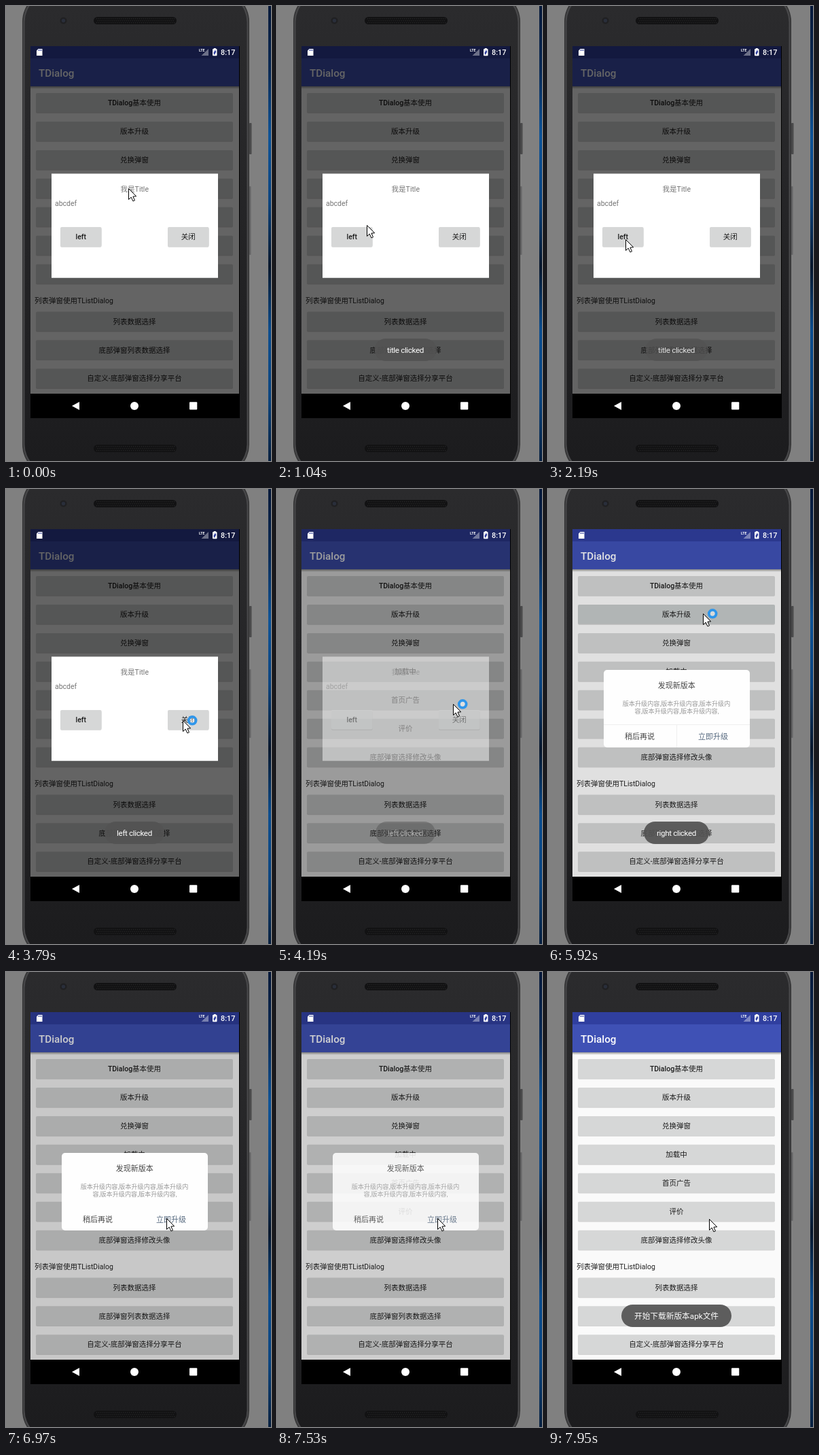
Animation of 390x669 px, one loop 8 s. Source, as an HTML page with a canvas:

```html
<!DOCTYPE html>
<html lang="zh">
<head>
<meta charset="utf-8">
<title>TDialog</title>
<style>
html, body { margin: 0; width: 100%; height: 100%; overflow: hidden; background: #808080; }
canvas { display: block; width: 390px; height: 669px; }
</style>
</head>
<body>
<canvas id="stage" width="390" height="669"></canvas>
<script>
const ctx = document.getElementById('stage').getContext('2d');
const LOOP = 8000;
const FONT = 'Roboto, "Noto Sans CJK SC", "Noto Sans CJK", sans-serif';

// Pointer moves between clicks.
const MOVES = [
  { from: 450, to: 1430, x: 114, y: 343 },
  { from: 3050, to: 3790, x: 260, y: 339.5 },
  { from: 4070, to: 4760, x: 257, y: 244 },
  { from: 4910, to: 5370, x: 228, y: 183 },
  { from: 6070, to: 6970, x: 236, y: 362 },
  { from: 7530, to: 7800, x: 237, y: 363 }
];

const MENU = ['TDialog基本使用', '版本升级', '兑换弹窗', '加载中', '首页广告', '评价', '底部弹窗选择修改头像'];
const LISTS = ['列表数据选择', '底部弹窗列表数据选择', '自定义-底部弹窗选择分享平台'];

const ramp = (t, a, b) => Math.min(1, Math.max(0, (t - a) / (b - a)));
const pulse = (t, a, b, c, d) => ramp(t, a, b) * (1 - ramp(t, c, d));
const easeOut = k => k * (1.5 - k / 2);

function pointerAt(t) {
  let x = 180, y = 268;
  for (const m of MOVES) {
    const k = easeOut(ramp(t, m.from, m.to));
    x += (m.x - x) * k;
    y += (m.y - y) * k;
  }
  return [Math.round(x), Math.round(y)];
}

function rect(x, y, w, h, color, r = 0) {
  ctx.fillStyle = color;
  ctx.beginPath();
  ctx.roundRect(x, y, w, h, r);
  ctx.fill();
}

function disc(x, y, r, color) {
  ctx.fillStyle = color;
  ctx.beginPath();
  ctx.arc(x, y, r, 0, Math.PI * 2);
  ctx.fill();
}

function poly(points, color) {
  ctx.fillStyle = color;
  ctx.beginPath();
  points.forEach(([x, y]) => ctx.lineTo(x, y));
  ctx.closePath();
  ctx.fill();
}

function text(s, x, y, size, color, align = 'center', weight = 400) {
  ctx.font = `${weight} ${size}px ${FONT}`;
  ctx.textAlign = align;
  ctx.fillStyle = color;
  ctx.fillText(s, x, y);
}

function fade(top, bottom, ...colors) {
  const g = ctx.createLinearGradient(0, top, 0, bottom);
  colors.forEach((c, i) => g.addColorStop(i / (colors.length - 1), c));
  return g;
}

function button(label, x, y, w, color = '#d6d7d7') {
  rect(x, y + 1, w, 28.8, 'rgba(0,0,0,.16)', 2);
  rect(x, y, w, 28.6, color, 2);
  text(label, x + w / 2, y + 18.2, 10.5, '#1b1b1b', 'center', /^[A-Za-z]/.test(label) ? 500 : 400);
}

function mesh(y) {
  rect(129, y, 122, 11, '#121213', 5.5);
  for (let row = 0; row < 3; row++)
    for (let x = 133 + row % 2 * 1.5; x < 248; x += 3)
      rect(x, y + 2 + row * 3, 1.3, 1.3, '#262627');
}

function phone() {
  rect(0, 0, 390, 669, '#808080');
  rect(386, 0, 4, 669, fade(0, 669, '#07193a', '#0a2a55', '#0d5398', '#0b4480', '#08172c', '#0b4d8f', '#0b4580', '#08203f'));
  rect(358, 172, 3.5, 46, '#4a4a4b', 1);
  rect(358, 265, 2.5, 101, '#646465', 1);
  rect(24, -22, 334, 712, '#343435', 45);
  rect(25.5, -20.5, 331, 709, '#48484a', 43.5);
  rect(27.5, -18.5, 327, 705, fade(0, 669, '#2b2b2d', '#242426', '#1c1c1e'), 42);
  mesh(16);
  mesh(645);
  disc(84.5, 21.5, 5, '#202022');
  disc(84.5, 21.5, 2.7, '#292e3a');
  rect(36, 59, 308, 547, '#000');
  poly([[97, 588], [108, 582], [108, 594]], '#fff');
  disc(189, 588, 6, '#fff');
  rect(270, 582.3, 11.3, 11.3, '#fff', 1);
}

function app(pressed) {
  rect(36, 59, 307, 511, '#fafafa');
  rect(36, 118, 307, 4, fade(118, 122, 'rgba(0,0,0,.4)', 'rgba(0,0,0,0)'));
  rect(36, 59, 307, 18, '#303f9f');
  rect(36, 77, 307, 41, '#3f51b5');
  text('TDialog', 48, 103.6, 15.2, '#fff', 'left', 500);
  MENU.forEach((s, i) => button(s, 44, 128 + i * 41.95, 290, pressed && i === 1 ? '#c6caca' : '#d6d7d7'));
  text('列表弹窗使用TListDialog', 42, 436.5, 10.5, '#222', 'left');
  LISTS.forEach((s, i) => button(s, 44, 449.4 + i * 41.9, 290));
}

function statusIcons() {
  poly([[47.5, 63], [53.5, 63], [53.5, 73], [45, 73], [45, 65.5]], '#fff');
  for (let x = 47.4; x < 52; x += 2) rect(x, 64, 1, 2, '#303f9f');
  text('LTE', 284, 67, 5.2, '#fff', 'left', 700);
  poly([[298, 63], [298, 73], [287.5, 73]], 'rgba(255,255,255,.38)');
  rect(305.8, 62, 3, 2, '#fff');
  rect(304, 63, 6.5, 10.3, '#fff', 1);
  poly([[308, 64.5], [305.3, 69], [306.6, 72], [309.3, 67.4]], '#303f9f');
  text('8:17', 316, 72.2, 10.8, '#fff', 'left', 500);
}

function withAlpha(alpha, draw) {
  if (alpha <= 0) return;
  ctx.save();
  ctx.globalAlpha = alpha;
  draw();
  ctx.restore();
}

function basicDialog() {
  rect(67, 246.5, 245, 153.2, '#fff');
  text('我是Title', 189.3, 273, 10.5, '#757575');
  text('abcdef', 72, 293.8, 10.5, '#757575', 'left');
  button('left', 80, 325, 60.6);
  button('关闭', 238, 325, 60.6);
}

function updateDialog(lines) {
  rect(82, 266, 215, 114, '#fefefe', 5);
  text('发现新版本', 189.3, 293, 11, '#444');
  text('版本升级内容,版本升级内容,版本升级内', 189, 319, 9.15, '#9a9a9a');
  text('容,版本升级内容,版本升级内容,', 189.5, 330, 9.15, '#9a9a9a');
  if (lines) {
    rect(82, 346, 215, 1, '#efefef');
    rect(189, 346, 1, 34, '#efefef');
  }
  text('稍后再说', 135, 367.8, 11, '#444');
  text('立即升级', 243, 367.8, 11, '#56697f');
}

function toast(label, x, w, alpha) {
  withAlpha(alpha, () => {
    rect(x, 489, w, 33, 'rgba(83,83,83,.92)', 16.5);
    ctx.letterSpacing = /^[a-z]/.test(label) ? '-0.38px' : '0px';
    text(label, x + w / 2, 510.2, 11.7, '#fff');
  });
}

function pointer(x, y, busy) {
  ctx.save();
  ctx.translate(x + .5, y + .5);
  if (busy) {
    disc(13.7, -.2, 5, 'rgba(255,255,255,.5)');
    ctx.strokeStyle = '#2f96ea';
    ctx.lineWidth = 3.8;
    ctx.beginPath();
    ctx.arc(13.7, -.2, 5.4, 0, Math.PI * 2);
    ctx.stroke();
  }
  poly([[0, 0], [0, 16], [3.7, 12.6], [6.4, 18.4], [9, 17.3], [6.4, 11.6], [11.2, 11.3]], '#fff');
  ctx.strokeStyle = '#000';
  ctx.lineWidth = 1;
  ctx.stroke();
  ctx.restore();
}

function draw(t) {
  phone();
  app(t >= 5680 && t < 6300);

  const dim = .6 * (1 - ramp(t, 4070, 4400)) + .2 * pulse(t, 5600, 6200, 7500, 7750);
  rect(36, 59, 307, 511, `rgba(0,0,0,${dim})`);
  statusIcons();

  withAlpha(1 - ramp(t, 4070, 4300), basicDialog);
  withAlpha(pulse(t, 5620, 5840, 7500, 7720), () => updateDialog(t < 6500));

  toast('title clicked', 143.5, 91, pulse(t, 150, 450, 2150, 2400));
  toast('left clicked', 145, 88, pulse(t, 2400, 2700, 4070, 4320));
  toast('right clicked', 141, 96, pulse(t, 4320, 4650, 6100, 6550));
  toast('开始下载新版本apk文件', 108, 162, ramp(t, 7620, 7920));

  const [x, y] = pointerAt(t);
  pointer(x, y, t >= 3500 && t < 6200);
}

const start = performance.now();
function tick() {
  draw((performance.now() - start) % LOOP);
  requestAnimationFrame(tick);
}
tick();
</script>
</body>
</html>
```
